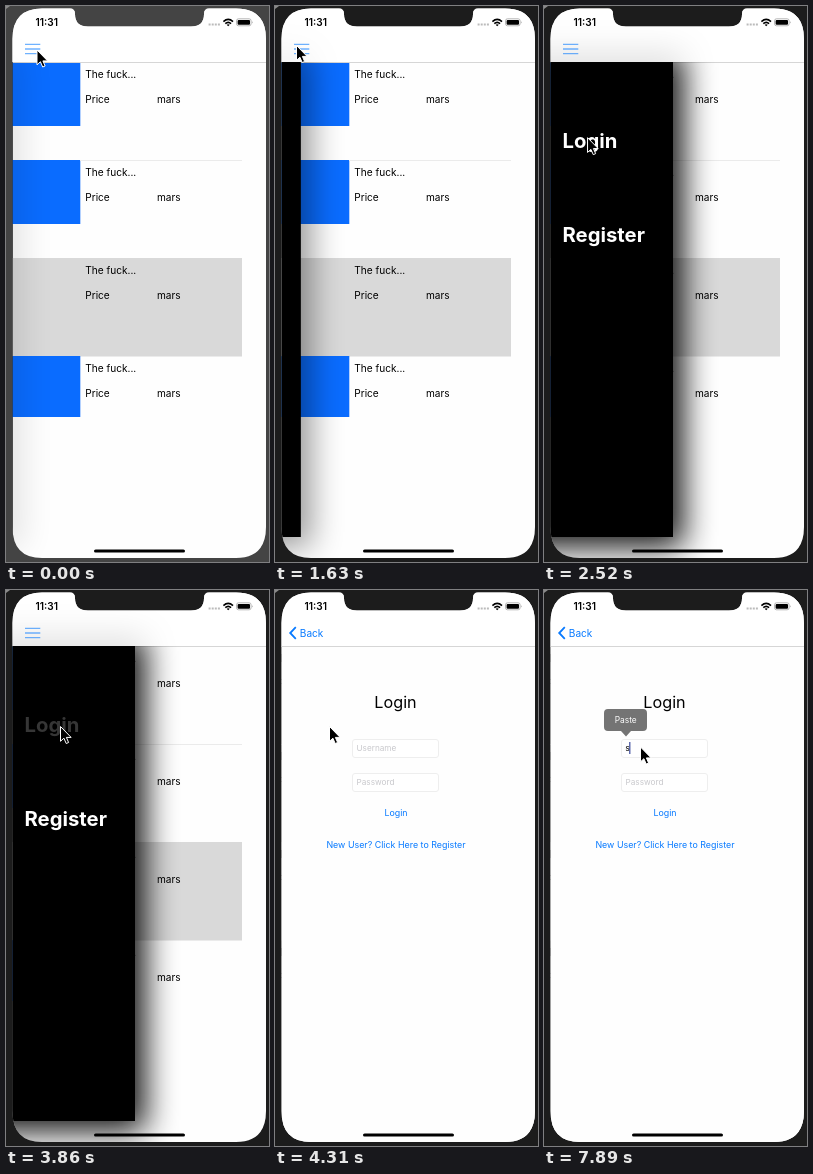
Animation of 263 by 556 pixels, one loop 8000 ms. Source, as an HTML page:

```html
<!DOCTYPE html>
<html lang="en">
<head>
<meta charset="utf-8">
<title>Side menu and login</title>
<style>
  html, body { margin: 0; width: 100%; height: 100%; overflow: hidden; background: #444; }
  svg { display: block; width: 263px; height: 556px; }
  text { font-family: Inter, Roboto, "Liberation Sans", sans-serif; font-size: 10.1px; fill: #000; }
  .menu { font-size: 20.3px; font-weight: 700; fill: #fff; }
  .mid { text-anchor: middle; }
  .link { font-size: 8.9px; fill: #087aff; }
  .hint { font-size: 8.2px; fill: #c8c8cc; }
  .field { fill: #fff; stroke: #eee; }
  .rule { stroke: #d6d6d6; }
  .blue { fill: none; stroke: #087aff; }
</style>
</head>
<body>
<svg viewBox="0 0 263 556">
  <defs>
    <clipPath id="screen">
      <path d="M36 2.5H64Q69 2.5 69 8Q69 20.5 82 20.5H185Q198 20.5 198 8Q198 2.5 203 2.5H230Q260 2.5 260 33V521Q260 552 230 552H36Q6.5 552 6.5 521V33Q6.5 2.5 36 2.5Z"/>
    </clipPath>
    <filter id="blur" filterUnits="userSpaceOnUse" x="-120" y="-20" width="330" height="630">
      <feGaussianBlur stdDeviation="16"/>
    </filter>
  </defs>

  <rect id="frame" width="263" height="556"/>
  <path d="M0 0H4L0 3Z" fill="#8a8a8a"/>

  <g clip-path="url(#screen)">
    <rect width="263" height="556" fill="#fefefe"/>
    <g id="list"></g>
    <path class="rule" d="M6 56.5H261"/>

    <g id="drawer">
      <rect id="shade" x="-60" y="46" width="199" height="495" filter="url(#blur)"/>
      <rect x="-4" y="56" width="133" height="475"/>
      <text id="loginItem" class="menu" x="18.5" y="142">Login</text>
      <text class="menu" x="18.5" y="236">Register</text>
    </g>

    <g id="page">
      <rect x="6" y="56" width="255" height="500" fill="#fefefe"/>
      <path class="rule" d="M6 56.5H261"/>
      <text class="mid" x="120.5" y="118" style="font-size:16.2px">Login</text>
      <rect class="field" x="77.5" y="149.5" width="86" height="18" rx="2.5"/>
      <rect class="field" x="77.5" y="183.5" width="86" height="18" rx="2.5"/>
      <text id="userHint" class="hint" x="81.5" y="161">Username</text>
      <text class="hint" x="81.5" y="195">Password</text>
      <text class="link mid" x="121" y="226">Login</text>
      <text class="link mid" x="121" y="258">New User? Click Here to Register</text>
      <text id="typed" x="81.2" y="161" style="font-size:8.6px">s</text>
      <rect id="caret" x="85.2" y="152" width="1.2" height="12" fill="#3b4a9c"/>
    </g>

    <rect x="6" y="0" width="255" height="56" fill="#fff" fill-opacity=".88"/>
    <path id="burger" class="blue" d="M19 38.4H34.3M19 43H34.3M19 47.6H34.3" stroke-width="1.3"/>
    <g id="back">
      <path class="blue" d="M20.8 37.2L15.2 43L20.8 48.8" stroke-width="1.8"/>
      <text x="24.8" y="46.6" style="fill:#087aff">Back</text>
    </g>

    <text x="29.5" y="20" style="font-weight:600">11:31</text>
    <path d="M202.6 18.6H214" stroke="#bbb" stroke-width="2" stroke-dasharray="2 1.1"/>
    <g fill="none" stroke="#000" stroke-width="1.6">
      <path d="M217.4 15.6Q222.2 11.2 227 15.6M219.3 17.6Q222.2 15 225.1 17.6"/>
      <path d="M222.2 20.2L220.6 18.7Q222.2 17.6 223.8 18.7Z" fill="#000" stroke="none"/>
    </g>
    <rect x="230.5" y="12.8" width="14.6" height="7" rx="2" fill="none" stroke="#999" stroke-width=".7"/>
    <rect x="231.6" y="13.9" width="12.4" height="4.8" rx="1"/>
    <path d="M246 15.2Q247.2 16.3 246 17.4Z" fill="#888"/>
    <rect x="88" y="543.4" width="91" height="3.2" rx="1.6"/>
  </g>

  <g id="paste">
    <path d="M64 119H99Q103 119 103 123V137Q103 141 99 141H87L82 146.5L77 141H64Q60 141 60 137V123Q60 119 64 119Z" fill="#2b2b2b"/>
    <text class="mid" x="81.7" y="133" style="font-size:8.4px;fill:#fff">Paste</text>
  </g>
  <path id="mouse" d="M0 0V14.8L3.4 11.7L5.7 17L8.1 16L5.9 10.9H10.6Z" stroke="#fff"/>
</svg>

<script>
const LOOP = 8000, TICK = 149, LEAD = 134;
const $ = id => document.getElementById(id);

// Pointer moves: first tick, last tick, where it arrives.
const HOME = { x: 31, y: 44 };
const MOVES = [
  { from: 0, to: 3, x: 27, y: 50 },
  { from: 3, to: 7, x: 21.5, y: 39.5 },
  { from: 13, to: 18, x: 52, y: 167 },
  { from: 18, to: 22, x: 54.5, y: 136.5 },
  { from: 30, to: 33, x: 132, y: 160 },
  { from: 39, to: 42, x: 96.5, y: 157 }
];

const ramp = (n, from, to) => Math.min(1, Math.max(0, (n - from) / (to - from)));
const easeIn = p => p ** 1.7;
const easeOut = (p, k = 1.4) => 1 - (1 - p) ** k;
const move = (id, x, y = 0) => $(id).setAttribute("transform", `translate(${x} ${y})`);
const fade = (id, v) => $(id).setAttribute("opacity", v);
const show = (id, on) => { $(id).style.display = on ? "" : "none"; };

function pointer(n) {
  return MOVES.reduce((p, m) => {
    const k = easeOut(ramp(n, m.from, m.to));
    return { x: p.x + (m.x - p.x) * k, y: p.y + (m.y - p.y) * k };
  }, HOME);
}

$("list").innerHTML = [0, 1, 2, 3].map(i => {
  const y = 56 + i * 98;
  const box = i === 2
    ? `<rect x="-4" y="${y}" width="240" height="98.5" fill="#d9d9d9"/>`
    : `<rect x="-4" y="${y}" width="78.3" height="${i === 3 ? 61 : 64}" fill="#0a6cff"/>`;
  const line = i === 1 ? `<path d="M74 ${y + .5}H236" stroke="#ebebeb"/>` : "";
  return `${box}${line}<text x="79.3" y="${y + 16}">The fuck...</text>
    <text x="79.3" y="${y + 41}">Price</text><text x="151" y="${y + 40.5}">mars</text>`;
}).join("");

function draw(t) {
  const n = Math.max(0, Math.floor((t - LEAD) / TICK));
  const open = easeIn(ramp(n, 9, 12));
  const push = easeOut(ramp(n, 25, 28), 2);
  const typed = n >= 52;
  const mouse = pointer(n);

  $("frame").setAttribute("fill", n < 9 ? "#444" : "#1c1c1c");
  move("mouse", mouse.x, mouse.y);
  move("list", -76 * push);
  move("drawer", -122 * (1 - open + push));
  fade("shade", Math.min(.95, .1 + 2 * open) * (1 - push));
  $("loginItem").style.fill = n >= 24 ? "#363636" : "#fff";

  show("page", push > 0);
  move("page", 254 * (1 - push));
  fade("burger", .58 * (1 - push));
  fade("back", push);

  show("userHint", !typed);
  show("typed", typed);
  show("caret", n >= 47);
  move("caret", typed ? 0 : -4);
  fade("paste", typed ? .65 : ramp(n, 47, 49));
}

const start = performance.now();
function loop() {
  draw((performance.now() - start) % LOOP);
  requestAnimationFrame(loop);
}
draw(0);
requestAnimationFrame(loop);
</script>
</body>
</html>
```
